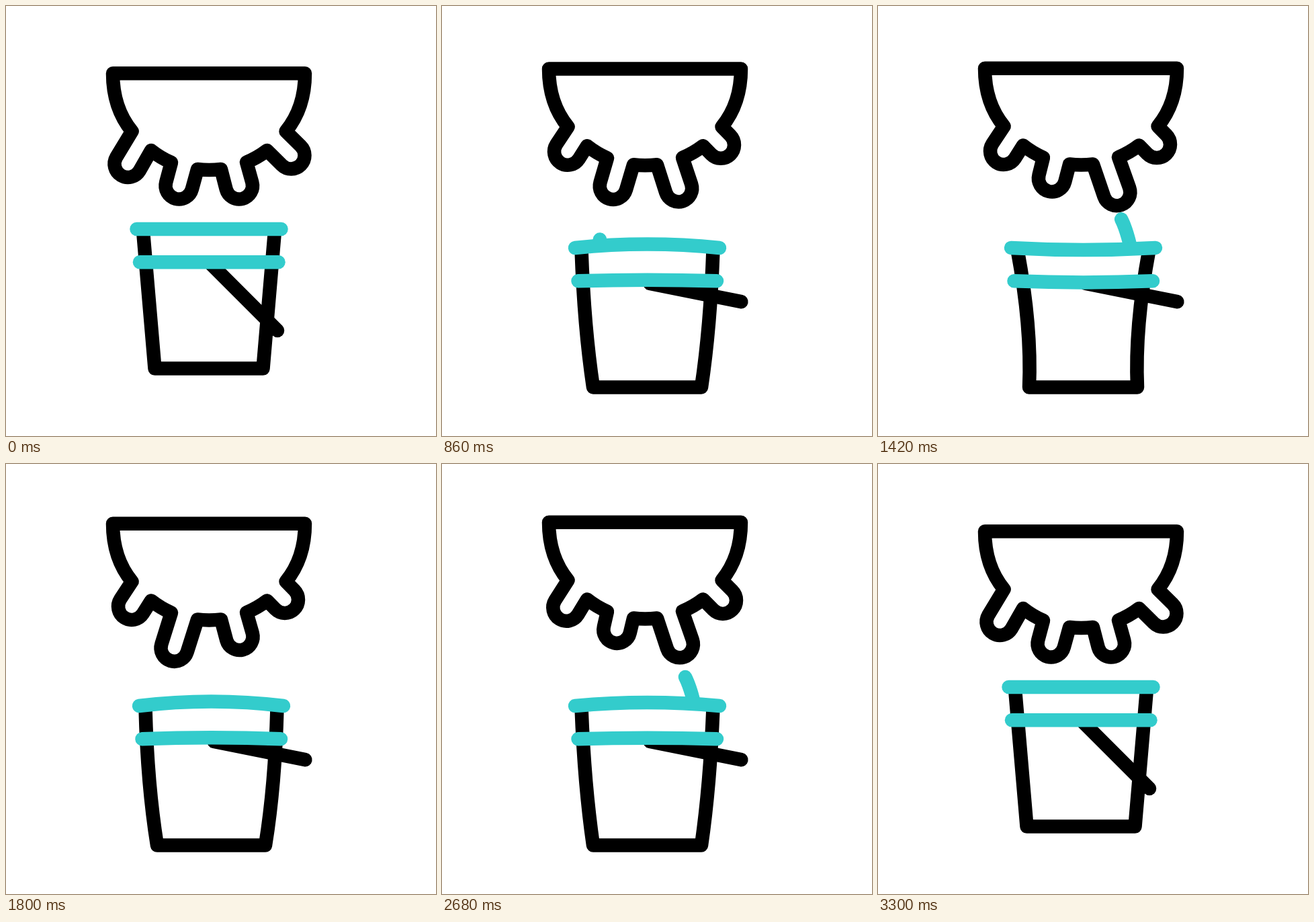
Animation of 640 by 640 pixels, one loop 3480 ms. Source, as an HTML page with a canvas:

```html
<!DOCTYPE html>
<html lang="en">
<head>
<meta charset="utf-8">
<title>Milking</title>
<style>
  html, body { margin: 0; width: 100%; height: 100%; overflow: hidden; background: #fff; }
  canvas { display: block; width: 640px; height: 640px; }
</style>
</head>
<body>
<canvas id="stage" width="640" height="640"></canvas>
<script>
const ctx = document.getElementById('stage').getContext('2d');
const LOOP = 3480, BLACK = '#000', TEAL = '#33cccc', TEAT_RADIUS = 20;

const clamp = u => Math.min(1, Math.max(0, u));
const mix = (a, b, u) => a + (b - a) * u;

// Value at time t of a list of [time, value] keys with eased steps.
function track(t, ...keys) {
  if (t <= keys[0][0]) return keys[0][1];
  for (let i = 1; i < keys.length; i++) {
    const [t0, v0] = keys[i - 1], [t1, v1] = keys[i];
    if (t < t1) return mix(v0, v1, 0.5 - 0.5 * Math.cos(Math.PI * (t - t0) / (t1 - t0)));
  }
  return keys[keys.length - 1][1];
}

function stroke(color, draw) {
  ctx.strokeStyle = color;
  ctx.beginPath();
  draw();
  ctx.stroke();
}

// Continues the outline from base point a around a rounded tip to base point b.
function teat(a, b, tipX, tipY) {
  const angle = Math.atan2(tipY - (a[1] + b[1]) / 2, tipX - (a[0] + b[0]) / 2);
  ctx.lineTo(...a);
  ctx.arc(tipX, tipY, TEAT_RADIUS, angle + Math.PI / 2, angle - Math.PI / 2, true);
  ctx.lineTo(...b);
}

function drawUdder(t) {
  const bob = track(t, [100, 0], [400, -16], [760, -4], [1080, -16], [1380, -7], [1660, -16],
    [2000, -4], [2260, -16], [2500, -4], [2760, -16], [3280, 0]);
  const tuck = track(t, [100, 0], [760, 1], [2430, 1], [3090, 0]);
  const left = track(t, [100, 0], [580, 1], [1140, -0.2], [1420, -0.2], [1820, 1],
    [2400, -0.4], [2680, -0.4], [3240, 0]);
  const right = track(t, [540, 0], [1200, 1.2], [1900, 0], [2460, 1.2], [3000, 0]);

  ctx.save();
  ctx.translate(0, bob);
  stroke(BLACK, () => {
    ctx.moveTo(445, 100.3);
    ctx.lineTo(159, 100.3);
    ctx.bezierCurveTo(159, 134, 169, 164, 187.5, 186.5);
    teat([187.5, 186.5], [216, 215], 181.5 + 5.5 * tuck, 235 - 11.5 * tuck);
    ctx.quadraticCurveTo(230, 226, 246, 233);
    teat([246, 233], [285, 243], 257.5 - 7 * left, 267.5 + 18 * left);
    ctx.quadraticCurveTo(302, 245, 320, 243);
    teat([320, 243], [358, 232.5], 347 + 9 * right, 267.5 + 18.5 * right);
    ctx.quadraticCurveTo(374, 226, 388.5, 215);
    teat([388.5, 215], [416.5, 186.5], 424.5 - 9.5 * tuck, 222.5 - 9 * tuck);
    ctx.bezierCurveTo(435, 164, 445, 134, 445, 100.3);
    ctx.closePath();
  });
  ctx.restore();
}

// A squirt grows along a curve down to the rim, then its tail follows.
function drawSquirt(age, rimY, from, bend, to) {
  const head = clamp(age / 100), tail = clamp((age - 255) / 100);
  if (head <= tail) return;
  ctx.save();
  ctx.beginPath();
  ctx.rect(0, 0, 640, rimY);
  ctx.clip();
  stroke(TEAL, () => {
    for (let i = 0; i <= 12; i++) {
      const u = mix(tail, head, i / 12);
      const at = k => mix(mix(from[k], bend[k], u), mix(bend[k], to[k], u), u);
      ctx.lineTo(at(0), at(1));
    }
  });
  ctx.restore();
}

function drawBucket(t, drop) {
  const shift = track(t, [300, 0], [800, 3.5], [2860, 3.5], [3280, 0]);
  const sag = track(t, [100, 0], [500, 3.5], [960, -6.5], [1420, 3], [1840, -6.7],
    [2200, 3], [2660, -5], [3280, 0]);
  const pinch = sag * (sag > 0 ? 4 : 1);
  const swing = track(t, [100, 45], [600, 11.3], [2860, 11.3], [3280, 45]) * Math.PI / 180;
  const reach = 138.6 + track(t, [2860, 0], [3040, 66], [3240, 0]);
  const hoop = (x0, x1, y, bend) => stroke(TEAL, () => {
    ctx.moveTo(x0, y);
    ctx.quadraticCurveTo((x0 + x1) / 2, y + 2 * bend, x1, y);
  });

  ctx.save();
  ctx.translate(shift, drop);
  stroke(BLACK, () => {
    ctx.moveTo(204, 335);
    ctx.quadraticCurveTo(213.5 + pinch, 450, 221.5, 539.6);
    ctx.lineTo(382.5, 539.6);
    ctx.quadraticCurveTo(390.5 - pinch, 450, 400, 335);
  });
  stroke(BLACK, () => {
    ctx.moveTo(306, 385);
    ctx.lineTo(306 + reach * Math.cos(swing), 385 + reach * Math.sin(swing));
  });
  hoop(194.5, 409.5, 332, sag);
  hoop(199, 405.5, 381.3, sag * (sag > 0 ? 0.7 : 0.3));
  ctx.restore();
}

function draw(t) {
  ctx.fillStyle = '#fff';
  ctx.fillRect(0, 0, 640, 640);
  ctx.lineWidth = 20.5;
  ctx.lineCap = ctx.lineJoin = 'round';
  const drop = track(t, [470, 0], [820, 28], [2860, 28], [3280, 0]);
  for (const start of [525, 1805]) {
    drawSquirt(t - start, 332 + drop, [241, 311], [236, 325], [234, 360]);
    drawSquirt(t - start - 640, 332 + drop, [362, 317], [370, 333], [376, 360]);
  }
  drawBucket(t, drop);
  drawUdder(t);
}

const begin = performance.now();
function frame() {
  draw((performance.now() - begin) % LOOP);
  requestAnimationFrame(frame);
}
frame();
</script>
</body>
</html>
```
